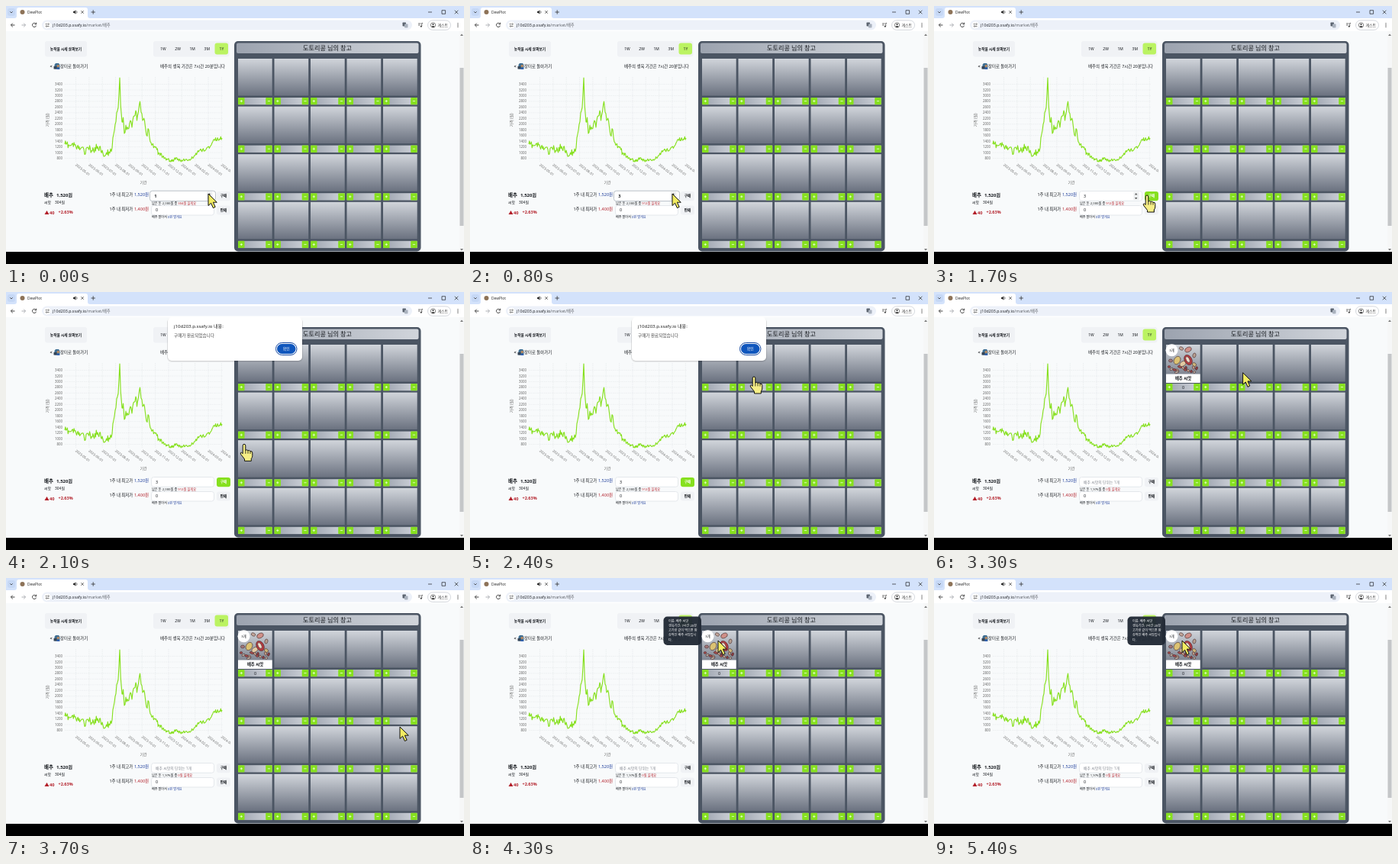
Write an HTML page that moves like this. It is 600 px wide and 338 px high and loops after 5500 ms.

```html
<!DOCTYPE html>
<html lang="ko">
<head>
<meta charset="utf-8">
<title>Market</title>
<style>
html, body { margin: 0; width: 100%; height: 100%; overflow: hidden; background: #000; }
svg { display: block; width: 100vw; height: 100vh; }
text { font-family: "Noto Sans", "Noto Sans CJK KR", "Noto Sans CJK", sans-serif; white-space: pre; }
</style>
</head>
<body>
<svg id="stage" viewBox="0 0 600 338" preserveAspectRatio="none">
  <defs>
    <linearGradient id="cell" x2="0" y2="1"><stop stop-color="#d1d5db"/><stop offset="1" stop-color="#6b7280"/></linearGradient>
    <linearGradient id="bar"><stop stop-color="#9ca3af"/><stop offset="1" stop-color="#d1d5db"/></linearGradient>
    <clipPath id="plot"><rect x="40" y="85" width="254" height="160"/></clipPath>
  </defs>
</svg>
<script>
const LOOP = 5500, INK = '#15181d', LIME = '#86e01e', RED = '#b3202a', BLUE = '#1f3f9c', PANEL = '#f0f2f5';
const stage = document.getElementById('stage');

function add(tag, attrs, parent = stage) {
  const el = document.createElementNS('http://www.w3.org/2000/svg', tag);
  for (const k in attrs) el.setAttribute(k, attrs[k]);
  return parent.appendChild(el);
}
const group = (parent, attrs = {}) => add('g', attrs, parent);
const rect = (x, y, width, height, fill, rx = 0, parent, more) =>
  add('rect', { x, y, width, height, fill, rx, ...more }, parent);
const dot = (cx, cy, r, fill, parent) => add('circle', { cx, cy, r, fill }, parent);
const ring = (cx, cy, r) => add('circle', { cx, cy, r, fill: 'none', stroke: '#444', 'stroke-width': 0.65 });
const line = (d, stroke, width = 0.8, parent, more) =>
  add('path', { d, stroke, fill: 'none', 'stroke-width': width, ...more }, parent);
const shape = (d, fill, parent, more) => add('path', { d, fill, ...more }, parent);

// y is the visual middle of the line
function text(str, x, y, size, { fill = INK, weight = 400, anchor = 'start', parent, more } = {}) {
  const el = add('text', { x, y: y + size * 0.36, 'font-size': size, fill,
    'font-weight': weight, 'text-anchor': anchor, ...more }, parent);
  el.textContent = str;
  return el;
}
const span = (str, fill, parent) => {
  const el = add('tspan', fill ? { fill } : {}, parent);
  el.textContent = str;
  return el;
};

function browser() {
  rect(0, 0, 600, 16, '#d3e2fb');
  rect(2, 3, 10, 10, '#c6d8f5', 3);
  line('M5.3 7.3l1.7 1.7 1.7-1.7', '#333');
  shape('M11 16q3 0 3-3V5q0-3 3-3h87q3 0 3 3v8q0 3 3 3z', '#fff');
  dot(21.5, 8, 3, '#8d7358');
  text('DewPlot', 28, 8, 4.9, { fill: '#333' });
  shape('M88 7h1.3l2-1.8v5.6l-2-1.8H88z', '#333');
  line('M92.4 6.4q1.4 1.6 0 3.2M98.3 6.2l3.6 3.6m0-3.6l-3.6 3.6', '#333', 0.7);
  line('M111.5 8h5.4m-2.7-2.7v5.4', '#333');
  line('M553 8h5M571 5.7h4.6v4.6h-4.600zM587.8 5.7l4.6 4.6m0-4.6l-4.6 4.6', '#222', 0.7);

  rect(0, 16, 600, 17, '#fff');
  line('M11.5 25h-5m2.3-2.4L6.4 25l2.4 2.4', '#333', 0.9);
  line('M20.5 25h5m-2.3-2.4l2.4 2.4-2.4 2.4', '#a5a8ad', 0.9);
  line('M39.3 23.5a2.6 2.6 0 1 0 .3 2.2M39.7 21.7v2.2h-2.2', '#333', 0.9);
  rect(47, 18.5, 485, 13, '#edf1f9', 6.5);
  dot(54, 25, 4.6, '#fff');
  line('M51.5 23.7h2.6M54 26.5h2.6', '#444', 0.7);
  ring(55.6, 23.7, 0.8);
  ring(53, 26.5, 0.8);
  const url = text('', 61, 25, 5.3);
  span('j10d203.p.ssafy.io', '#25282d', url);
  span('/market/배추', '#62666c', url);
  rect(519.5, 21.5, 4.5, 5, '#5c6470', 0.7);
  rect(522, 23.5, 4.5, 5, '#aab2be', 0.7);
  line('M540 23h3.5M540 25h2.5M544.7 26.5v-4h1.4', '#333', 0.7);
  dot(543.8, 26.7, 1, '#333');
  rect(552.5, 18.8, 30, 12.6, '#fff', 6.3, stage, { stroke: '#c3c8d0', 'stroke-width': 0.7 });
  ring(559.5, 25, 3.2);
  dot(559.5, 24, 1.1, '#333');
  shape('M557.4 27q2.1-2 4.2 0-2.1 2-4.2 0z', '#333');
  text('게스트', 565.5, 25, 4.9, { fill: '#333' });
  for (const y of [22.8, 25, 27.2]) dot(592, y, 0.65, '#333');

  rect(0, 33, 600, 289, '#f8fafb');
  rect(594, 33, 6, 289, '#f6f7f7');
  rect(594.5, 81, 5, 207, '#c4c6c8');
  shape('M595 39l2-2.5 2 2.5z', '#777');
  shape('M595 318l2 2.5 2-2.5z', '#777');
  rect(0, 322, 600, 16, '#000');
}

function topControls() {
  rect(51, 46, 55, 20.5, PANEL, 3);
  text('농작물 시세 살펴보기', 78.5, 56, 4.7, { weight: 700, anchor: 'middle' });
  rect(193, 46, 99.5, 20.5, PANEL, 3);
  rect(273.5, 48.5, 17.5, 15, '#bbf362', 3);
  ['1W', '2W', '1M', '3M', '1Y'].forEach((s, i) =>
    text(s, 206 + i * 19.1, 56, 5, { anchor: 'middle', weight: 500 }));
  text('<', 57.5, 79.5, 5.5, { weight: 700 });
  shape('M63.5 77l1.5-2h4l1.5 2v5.5h-7z', '#3f6f93');
  rect(62.5, 79, 4, 3.5, '#354456');
  dot(68.3, 78.5, 1.7, '#b98a62');
  shape('M66 83q2.3-5 4.6 0z', '#315fae');
  text('장터로 돌아가기', 71, 79.5, 5.4, { weight: 500 });
  text('배추의 생육 기간은 7시간 20분입니다', 287, 79.5, 5.45, { weight: 500, anchor: 'end' });
}

function chart() {
  const g = group(stage, { 'clip-path': 'url(#plot)' });
  const gray = '#666', dash = { 'stroke-dasharray': '1.5 1' };
  for (let i = 0; i < 14; i++) {
    const y = 199.5 - i * 7.46;
    line(`M77 ${y}H284`, '#dfe2e4', 0.5, g, dash);
    text(800 + i * 200, 74, y, 4.4, { fill: gray, anchor: 'end', parent: g });
  }
  for (let i = 0; i < 12; i++) {
    const x = 91.5 + i * 17.35, month = (i + 4) % 12 + 1;
    line(`M${x} 93V204`, '#dfe2e4', 0.5, g, dash);
    text(`${i < 8 ? 2023 : 2024}-${String(month).padStart(2, '0')}-01`, 0, 0, 4.4,
      { fill: gray, parent: g, more: { transform: `translate(${x} 207.5) rotate(38)` } });
  }
  text('가격 (원)', 0, 0, 4.9, { fill: gray, anchor: 'middle', parent: g,
    more: { transform: 'translate(54.5 149.5) rotate(-90)' } });
  text('기간', 180, 231, 5, { fill: gray, anchor: 'middle', parent: g });

  // x, y pairs of the main bends; the daily wobble is seeded
  const bends = [77, 181, 83, 183, 90, 182, 95, 187, 100, 185, 104, 194, 107, 185, 113, 190, 120, 184,
    126, 189, 130, 196, 135, 191, 139, 186, 141, 168, 143, 155, 145, 140, 147, 133, 149, 94,
    150.2, 130, 152, 152, 153.5, 146, 155, 167, 157, 156, 160, 161, 163, 150, 165, 159, 168, 144,
    170, 137, 171.5, 150, 173, 141, 175.5, 125, 177, 139, 179, 150, 181.5, 150, 184, 169, 187, 162,
    190, 179, 195, 184, 201, 193, 208, 199, 215, 203, 222, 201, 232, 202, 241, 202, 247, 196,
    254, 189, 262, 188, 269, 182, 272, 175, 278, 175, 283, 173];
  let seed = 11, d = `M${bends[0]} ${bends[1]}`;
  const rnd = () => (seed = seed * 16807 % 2147483647) / 2147483647 - 0.5;
  for (let i = 0; i < bends.length - 2; i += 2) {
    const [x0, y0, x1, y1] = bends.slice(i, i + 4);
    const n = Math.max(1, Math.round((x1 - x0) / 0.9));
    const amp = x0 < 200 ? 9 : 5;
    for (let k = 1; k <= n; k++) {
      const f = k / n, jitter = k < n ? rnd() * amp : 0;
      d += `L${x0 + (x1 - x0) * f} ${Math.min(204, y0 + (y1 - y0) * f + jitter)}`;
    }
  }
  line(d, LIME, 1.15, g, { 'stroke-linejoin': 'round' });
}

function prices() {
  text('배추', 50, 247.5, 6.5, { weight: 700 });
  text('1,520원', 66, 247.5, 6, { weight: 700 });
  text('씨앗', 50, 257, 4.9, { weight: 500 });
  text('304원', 64, 257, 4.9, { weight: 500 });
  shape('M50.5 273l3-5 3 5z', RED);
  text('40', 57, 270.5, 5.7, { fill: RED, weight: 600 });
  text('+2.63%', 68.5, 270.5, 5.5, { fill: RED, weight: 600 });
  text('1주 내 최고가', 135.5, 247, 5.4, { weight: 500 });
  text('1,520원', 168, 247, 5.5, { fill: BLUE, weight: 500 });
  text('1주 내 최저가', 135.5, 266, 5.4, { weight: 500 });
  text('1,400원', 168, 266, 5.5, { fill: RED, weight: 500 });
  const edge = { stroke: '#dfe3e7', 'stroke-width': 0.8 };
  rect(190.5, 261.5, 82, 12.5, '#fff', 3, stage, edge);
  text('0', 196, 267.5, 5.3);
  const sell = text('배추 팔아서 ', 191, 277, 4.1, { weight: 500 });
  span('0원 벌게요', BLUE, sell);
  rect(276, 261.5, 18, 12, PANEL, 3);
  text('판매', 285, 267.5, 4.7, { weight: 700, anchor: 'middle' });

  const field = group(stage);
  const box = rect(190.5, 242.5, 82, 12.8, '#fff', 3, field, edge);
  const value = text('', 196, 248.7, 5.3, { parent: field });
  const spin = group(field);
  rect(261.5, 243.8, 7, 10.3, '#eceeef', 0, spin);
  shape('M263 247.3l1.7-2 1.7 2z', '#444', spin);
  shape('M263 251l1.7 2 1.7-2z', '#444', spin);
  const note = text('', 191, 258.3, 4.2, { weight: 500 });
  const left = span('', '', note), cost = span('', RED, note);
  const buy = rect(276, 243, 18, 12.2, PANEL, 3);
  const buyText = text('구매', 285, 248.8, 4.7, { weight: 700, anchor: 'middle' });
  return { field, box, value, spin, left, cost, buy, buyText };
}

function storage() {
  rect(299, 46, 244.5, 275.5, '#4b5563', 5);
  rect(302, 48.5, 238.5, 13.5, 'url(#bar)', 2);
  text('도토리콩 님의 창고', 421, 55, 8.1, { weight: 500, anchor: 'middle' });
  for (let i = 0; i < 20; i++) {
    const x = 304 + i % 5 * 47.5, y = 69 + Math.floor(i / 5) * 62.6;
    rect(x, y, 44.7, 48.5, 'url(#cell)');
    rect(x, y + 51, 44.7, 9.3, 'url(#bar)');
    rect(x, y + 51, 8.5, 9.3, LIME, 1);
    rect(x + 36.2, y + 51, 8.5, 9.3, LIME, 1);
    line(`M${x + 2.7} ${y + 55.6}h3.2m-1.6-1.6v3.2M${x + 38.9} ${y + 55.6}h3.2`, '#f4ffe6');
  }
}

function seeds() {
  const g = group(stage);
  const bean = (x, y, rx, ry, turn, fill) => add('ellipse', { cx: x, cy: y, rx, ry, fill,
    stroke: '#4a3030', 'stroke-width': 0.6, transform: `rotate(${turn} ${x} ${y})` }, g);
  const row = ['#a94a4c', '#c8a08a', '#8f3b42', '#b9aaa0'];
  for (let i = 0; i < 14; i++)
    bean(308 + i * 11 % 37, 98 + i * 5 % 8, 1.8 + i % 3 * 0.5, 1.4, i * 47, row[i % 4]);
  bean(324, 74, 2.8, 2, 25, '#c2a69a');
  bean(333, 75.5, 4.5, 3, -25, '#cf8f88');
  bean(341, 83, 2, 3, 15, '#b8a092');
  bean(318.5, 89.5, 4, 5.5, 30, '#dcc272');
  bean(326, 94, 4.5, 3, -30, '#e2c9a2');
  bean(333, 89, 4.8, 7, -28, '#b4393f');
  bean(332.5, 88.5, 2.2, 4.2, -28, '#f0dccb');
  bean(310, 90, 2.6, 2, 0, '#a2777a');
  bean(341, 95, 2.8, 2.2, 40, '#cdb57a');
  dot(311.5, 76.3, 8, '#fff', g);
  text('3개', 311.5, 76.3, 4.3, { anchor: 'middle', parent: g });
  rect(304, 107.5, 44.7, 11.5, '#fff', 0, g);
  text('배추 씨앗', 326.5, 113, 5.4, { weight: 700, anchor: 'middle', parent: g });
  text('0', 326.5, 125, 5.4, { anchor: 'middle', parent: g });
  return g;
}

function tooltip() {
  const g = group(stage);
  rect(253.5, 50.5, 49.5, 37.5, '#222a36', 5, g, { opacity: 0.96 });
  ['이름: 배추 씨앗', '생육기간: 7시간 20분', '고기랑 같이 먹으면 환', '상적인 배추 씨앗입니', '다.']
    .forEach((s, i) => text(s, 260, 56.2 + i * 6.25, 4.15, { fill: '#fff', parent: g }));
  return g;
}

function dialog() {
  const g = group(stage);
  rect(211, 34, 178, 58, '#000', 6, g, { opacity: 0.07 });
  rect(211.5, 33.5, 177, 57.2, '#000', 5.5, g, { opacity: 0.1 });
  rect(212, 33, 176, 57, '#fff', 5, g);
  text('j10d203.p.ssafy.io 내용:', 220, 45.2, 6.05, { fill: '#222', parent: g });
  text('구매가 완료되었습니다', 220, 57, 5.6, { fill: '#444', parent: g });
  rect(353.5, 66.5, 27.5, 16, '#fff', 8, g, { stroke: '#12459f', 'stroke-width': 1 });
  const ok = rect(355, 68, 24.5, 13, '#0f56bd', 6.5, g);
  text('확인', 367.3, 74.3, 4.9, { fill: '#fff', anchor: 'middle', parent: g });
  return { g, ok };
}

function pointer() {
  const g = group(stage);
  const look = { stroke: '#111', 'stroke-width': 1, 'stroke-linejoin': 'round' };
  const arrow = shape('M0 0V15.5L3.6 12.2 6.4 18.6 9.2 17.3 6.4 11.2H11.3Z', '#f2ec62', g, look);
  const hand = group(g);
  shape('M-1.8 1.8Q-1.8 0 0 0T1.8 1.8V8Q3.8 6.6 5 8.4 6.9 7.4 8 9.3 10.8 8.6 10.8 11.5V15Q10.8 17.5 9.3 19V22H.5V19.5L-4.6 13Q-5.4 10.8-3.4 10.9L-1.8 12.4Z',
    '#f6ee86', hand, look);
  line('M1.8 8v4.5M5 8.4v4M8 9.3v3.3', '#111', 0.8, hand);
  return { g, arrow, hand };
}

browser();
topControls();
chart();
const ui = prices();
storage();
const item = seeds(), tip = tooltip(), alertBox = dialog(), mouse = pointer();

// time, x, y of the pointer tip
const path = [
  [0, 265, 246], [1250, 265, 246], [1600, 279, 248], [1900, 279, 248], [2400, 372, 111],
  [2600, 397, 98], [3000, 365, 74], [3150, 365, 74], [3600, 516, 195], [3700, 516, 195],
  [4200, 325, 82], [LOOP, 325, 82]
];
function tipAt(t) {
  const i = path.findIndex((p, k) => k && t <= p[0]);
  const [t0, x0, y0] = path[i - 1], [t1, x1, y1] = path[i];
  const f = (t - t0) / (t1 - t0), e = f * f * (3 - 2 * f);
  return [x0 + (x1 - x0) * e, y0 + (y1 - y0) * e];
}
const show = (el, on) => el.setAttribute('visibility', on ? 'visible' : 'hidden');
const put = (el, s) => { if (el.textContent !== s) el.textContent = s; };

function draw(t) {
  const count = t < 200 ? 1 : t < 800 ? 2 : 3, done = t >= 3200;
  put(ui.value, done ? '배추 씨앗의 단위는 1개' : String(count));
  ui.value.setAttribute('font-size', done ? 4.9 : 5.3);
  ui.value.setAttribute('fill', done ? '#858a92' : INK);
  put(ui.left, `남은 돈 ${done ? '1,976' : '2,000'}원 중 `);
  put(ui.cost, `${done ? 0 : count * 304}원 쓸게요`);

  const grow = 1 + 0.05 * Math.max(0, Math.min(1, (1500 - t) / 150));
  ui.field.setAttribute('transform', `translate(231.5 248.8) scale(${grow}) translate(-231.5 -248.8)`);
  ui.value.setAttribute('font-weight', grow > 1.02 ? 700 : 400);
  ui.box.setAttribute('stroke', grow > 1.02 ? '#aeb5be' : '#dfe3e7');
  show(ui.spin, t < 1900);
  const hot = t >= 1450 && t < 3200;
  ui.buy.setAttribute('fill', hot ? LIME : PANEL);
  ui.buyText.setAttribute('fill', hot ? '#fff' : INK);

  show(alertBox.g, t >= 1900 && t < 3200);
  alertBox.ok.setAttribute('fill', t >= 2900 ? '#194b9b' : '#0f56bd');
  show(item, done);
  show(tip, t >= 4100);

  const hand = t >= 1450 && t < 2700;
  show(mouse.hand, hand);
  show(mouse.arrow, !hand);
  mouse.g.setAttribute('transform', `translate(${tipAt(t).join(' ')})`);
}

const start = performance.now();
function tick() {
  draw((performance.now() - start) % LOOP);
  requestAnimationFrame(tick);
}
tick();
</script>
</body>
</html>
```
